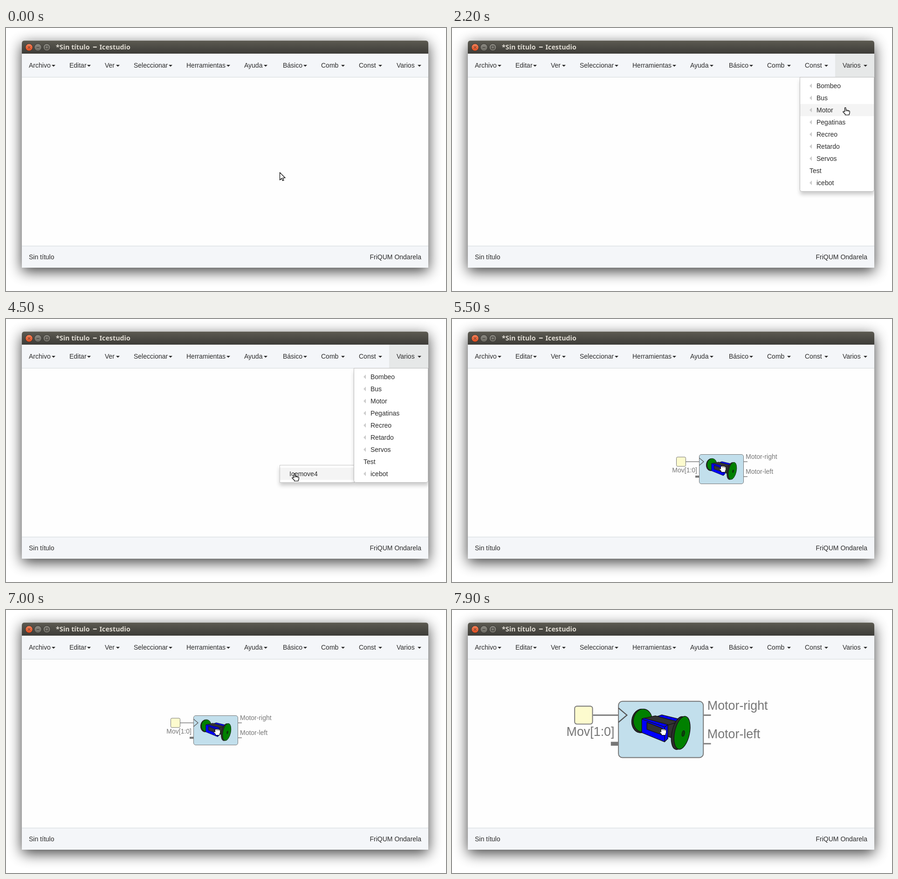
These frames come from a looping animation (944 px wide and 564 px high, 8000 ms). An HTML page:

```html
<!DOCTYPE html>
<html lang="es">
<head>
<meta charset="utf-8">
<title>Icestudio</title>
<style>
html, body { margin: 0; width: 100%; height: 100%; overflow: hidden; background: #fff; }
svg { display: block; width: 944px; height: 564px; font: 14px "Liberation Sans", Arial, sans-serif; }
.title { font: bold 14.3px "Noto Sans", "Open Sans", sans-serif; fill: #dfdbd2; }
.ui { fill: #2b2b2b; }
.label { fill: #777; }
</style>
</head>
<body>
<svg viewBox="0 0 944 564" xmlns="http://www.w3.org/2000/svg">
  <defs>
    <linearGradient id="bar" x1="0" y1="0" x2="0" y2="1">
      <stop offset="0" stop-color="#5c5a51"/>
      <stop offset="1" stop-color="#3d3c38"/>
    </linearGradient>
    <linearGradient id="red" x1="0" y1="0" x2="0" y2="1">
      <stop offset="0" stop-color="#f4855d"/>
      <stop offset="1" stop-color="#dd4a1d"/>
    </linearGradient>
    <linearGradient id="grey" x1="0" y1="0" x2="0" y2="1">
      <stop offset="0" stop-color="#8d8b83"/>
      <stop offset="1" stop-color="#6b6962"/>
    </linearGradient>
    <filter id="far" filterUnits="userSpaceOnUse" x="-60" y="-60" width="1064" height="684">
      <feGaussianBlur stdDeviation="15"/>
    </filter>
    <filter id="near" filterUnits="userSpaceOnUse" x="560" y="80" width="384" height="310">
      <feGaussianBlur stdDeviation="4"/>
    </filter>
    <clipPath id="inside"><rect x="34" y="105" width="872" height="362"/></clipPath>
  </defs>

  <rect x="34" y="35" width="872" height="487" filter="url(#far)" opacity=".75"/>
  <rect x="34" y="50" width="872" height="464" fill="#fefefe"/>
  <path d="M34 55V33q0-6 6-6H900q6 0 6 6V55z" fill="url(#bar)"/>
  <path d="M39 27.5H901" stroke="#6f6d63"/>
  <g stroke="#33322e">
    <circle cx="49.5" cy="41.5" r="7.8" fill="url(#red)"/>
    <circle cx="68.5" cy="41.5" r="7.8" fill="url(#grey)"/>
    <circle cx="87.5" cy="41.5" r="7.8" fill="url(#grey)"/>
    <path d="M47 39l5 5m0-5l-5 5M65.500 41.500h6M84.500 38.500h6v6h-6z" fill="none"/>
  </g>
  <text class="title" y="46"><tspan x="107">*Sin título</tspan><tspan x="186" font-size="19">–</tspan><tspan x="200.500">Icestudio</tspan></text>

  <rect x="34" y="55" width="872" height="50" fill="#f4f6f9"/>
  <rect id="tab" x="822" y="55" width="84" height="50" fill="#e6e8e8"/>
  <path d="M34 105.500H906M34 467.500H906" stroke="#d3d8dc"/>
  <rect x="34" y="468" width="872" height="46" fill="#f4f6f9"/>
  <g id="nav" class="ui"></g>
  <g class="ui">
    <text x="49" y="496">Sin título</text>
    <text x="891" y="496" text-anchor="end">FriQUM Ondarela</text>
  </g>

  <g clip-path="url(#inside)">
    <g id="sub">
      <rect x="587" y="319" width="160" height="38" filter="url(#near)" opacity=".2"/>
      <rect x="587.5" y="313.5" width="160" height="37" fill="#fff" stroke="#c8c8c8"/>
      <rect id="subRow" x="588" y="319" width="159" height="26" fill="#f4f4f4"/>
      <text class="ui" x="608" y="337">Icemove4</text>
    </g>
    <g id="menu">
      <rect x="747" y="112" width="159" height="245" filter="url(#near)" opacity=".2"/>
      <path d="M746.500 105.500H905.500V346.500q0 4-4 4H750.500q-4 0-4-4z" fill="#fff" stroke="#bbb"/>
      <rect id="row" x="747" width="158" height="26" fill="#f4f4f4"/>
      <g id="items" class="ui"></g>
    </g>
  </g>

  <g id="block">
    <path d="M-28 16H0M96 16h8M96 48h8" stroke="#808080" stroke-width="1.6"/>
    <path d="M-8 48H0" stroke="#777" stroke-width="4.400"/>
    <rect x="-48.5" y="6" width="20" height="20" rx="2.5" fill="#fdfbce" stroke="#777"/>
    <rect x=".5" y=".5" width="95" height="63" rx="4.5" fill="#c2dfec" stroke="#777"/>
    <path d="M.5 8L10 16L.5 24" fill="none" stroke="#555" stroke-width="1.200"/>
    <g class="label">
      <text x="-4" y="39" text-anchor="end">Mov[1:0]</text>
      <text x="100" y="10">Motor-right</text>
      <text x="100" y="42">Motor-left</text>
    </g>
    <g transform="scale(.5217) translate(-356 -195)" stroke="#151515" stroke-width="1.400" stroke-linejoin="round">
      <ellipse cx="405.500" cy="238" rx="20" ry="25.500" transform="rotate(8 405.500 238)" fill="#2c2c2c"/>
      <ellipse cx="409" cy="237" rx="20" ry="24.500" transform="rotate(8 409 237)" fill="#008000"/>
      <path d="M441 228L450 225L491 235L486 246L441 236z" fill="#00f"/>
      <path d="M408 233L436 227L485 240L478 277L462 271L420 256z" fill="#333"/>
      <path d="M463 247L485 240" fill="none"/>
      <path d="M407 234L412 232L463 246V276L456 283L407 263z" fill="#00f"/>
      <path d="M407 234L456 251L463 246M456 251V283" fill="none"/>
      <path d="M418 241L451 254V268L418 256z" fill="#333"/>
      <ellipse cx="487.500" cy="264" rx="16" ry="36" transform="rotate(12 487.500 264)" fill="#2c2c2c"/>
      <ellipse cx="493.500" cy="263.500" rx="16" ry="36" transform="rotate(12 493.500 263.500)" fill="#008000"/>
      <ellipse cx="496" cy="265" rx="2.500" ry="6" transform="rotate(12 496 265)" fill="#064d06"/>
    </g>
  </g>

  <g id="cursor" fill="#fff" stroke="#000" stroke-linejoin="round">
    <path id="arrow" d="M.5.8V17L4.300 13.500L6.600 18.500L9 17.400L6.800 12.500H12z" stroke-width="1.200"/>
    <g id="point">
      <path d="M4.500 9.500V2.300Q4.500.7 5.800.7T7.100 2.300V6Q9 5.300 9.800 6.700Q11.600 6 12.400 7.400Q15.200 7.200 15.200 9V12Q15.200 13.500 14 14.500V16.500H5.500V14.500L1 10.300Q.7 8.600 2.400 8.500z" stroke-width="1.200"/>
      <path d="M7.100 6.500V9M9.800 7V9M12.400 7.500V9.500" stroke-width=".9"/>
    </g>
    <g id="grab">
      <path d="M3.500 8V3.300Q3.500 1.600 5 1.600Q6 .6 7.200 1.300Q8.600.6 9.800 1.600Q11.300 1.100 12.200 2.300Q14.700 2.200 14.700 4.200V8.500Q14.700 10.200 13.300 11.500V14.500H4.500V12L.8 8.500Q.5 6.500 2 6.500z"/>
      <path d="M7 2V4.500M9.700 2.200V4.500M12.200 3V5" stroke-width=".8"/>
    </g>
  </g>
</svg>
<script>
const LOOP = 8000, STEP = 100, GRID = 8;
const $ = id => document.getElementById(id);
const show = (id, on) => $(id).setAttribute('display', on ? 'inline' : 'none');
const move = (id, x, y) => $(id).setAttribute('transform', `translate(${x} ${y})`);

// label, text x, caret x
const NAV = [
  ['Archivo', 49, 98], ['Editar', 136, 174], ['Ver', 212, 236],
  ['Seleccionar', 274, 349], ['Herramientas', 387, 473], ['Ayuda', 511, 553],
  ['Básico', 594, 638], ['Comb', 676, 719], ['Const', 757, 799], ['Varios', 838, 883]
];
$('nav').innerHTML = NAV.map(([name, x, caret]) =>
  `<text x="${x}" y="85">${name}</text><path d="M${caret} 79h8l-4 4z"/>`).join('');

const ITEMS = ['Bombeo', 'Bus', 'Motor', 'Pegatinas', 'Recreo', 'Retardo', 'Servos', 'Test', 'icebot'];
const ROW = 26, TOP = 111;
$('items').innerHTML = ITEMS.map((name, i) => {
  const y = TOP + ROW / 2 + i * ROW;
  return name === 'Test'
    ? `<text x="767" y="${y + 5}">${name}</text>`
    : `<path d="M767 ${y}l5-5v10z" fill="#ccc"/><text x="782" y="${y + 5}">${name}</text>`;
}).join('');

// time, x, y
const POINTER = [
  [300, 587, 309], [500, 615, 293], [1000, 800, 150], [1200, 838, 123],
  [1400, 852, 94], [1700, 860, 79], [1900, 860, 79], [2200, 838, 170],
  [2500, 826, 239], [2700, 826, 239], [3300, 817, 333], [3500, 817, 333],
  [3600, 805, 333], [4400, 627, 331], [4500, 613, 331], [5200, 613, 331],
  [5300, 613, 327], [5400, 613, 327], [5600, 533, 300], [5700, 533, 300],
  [6000, 461, 273], [6400, 445, 253], [6700, 445, 253], [6800, 438, 262],
  [6900, 447, 264], [7000, 445, 254]
];
const BLOCK = [
  [5400, 570, 298], [5600, 490, 274], [5700, 490, 274], [6000, 418, 250], [6400, 402, 226]
];
const ZOOM = [[7900, 1.917], [7600, 1.56], [7300, 1.235], [0, 1]];
const FOCUS = [452, 260];

function at(keys, t) {
  const next = keys.findIndex(k => k[0] > t);
  if (next < 0) return keys[keys.length - 1].slice(1);
  if (next === 0) return keys[0].slice(1);
  const [t0, x0, y0] = keys[next - 1], [t1, x1, y1] = keys[next];
  const p = (t - t0) / (t1 - t0);
  return [x0 + (x1 - x0) * p, y0 + (y1 - y0) * p];
}

const snap = v => Math.round((v - 2) / GRID) * GRID + 2;

function draw(t) {
  const [x, y] = at(POINTER, t).map(Math.round);
  const tipX = x + 5;
  const open = t >= 1400 && t < 5200;
  const placed = t >= 5300;
  const inSub = open && t >= 3300 && tipX < 747;
  const row = inSub ? -1 : Math.floor((y - TOP) / ROW);

  show('tab', open);
  show('menu', open);
  show('row', row >= 0 && row < ITEMS.length);
  $('row').setAttribute('y', TOP + row * ROW);
  show('sub', open && t >= 3300);
  show('subRow', inSub);

  show('block', placed);
  const [bx, by] = at(BLOCK, t).map(snap);
  const s = ZOOM.find(z => t >= z[0])[1];
  const [fx, fy] = FOCUS;
  $('block').setAttribute('transform',
    `translate(${fx + (bx - fx) * s} ${fy + (by - fy) * s}) scale(${s})`);

  move('cursor', x, y);
  show('arrow', t < 1400);
  show('point', t >= 1400 && !placed);
  show('grab', placed);
}

const start = performance.now();
function tick() {
  const t = (performance.now() - start) % LOOP;
  draw(Math.floor(t / STEP) * STEP);
  requestAnimationFrame(tick);
}
tick();
</script>
</body>
</html>
```
